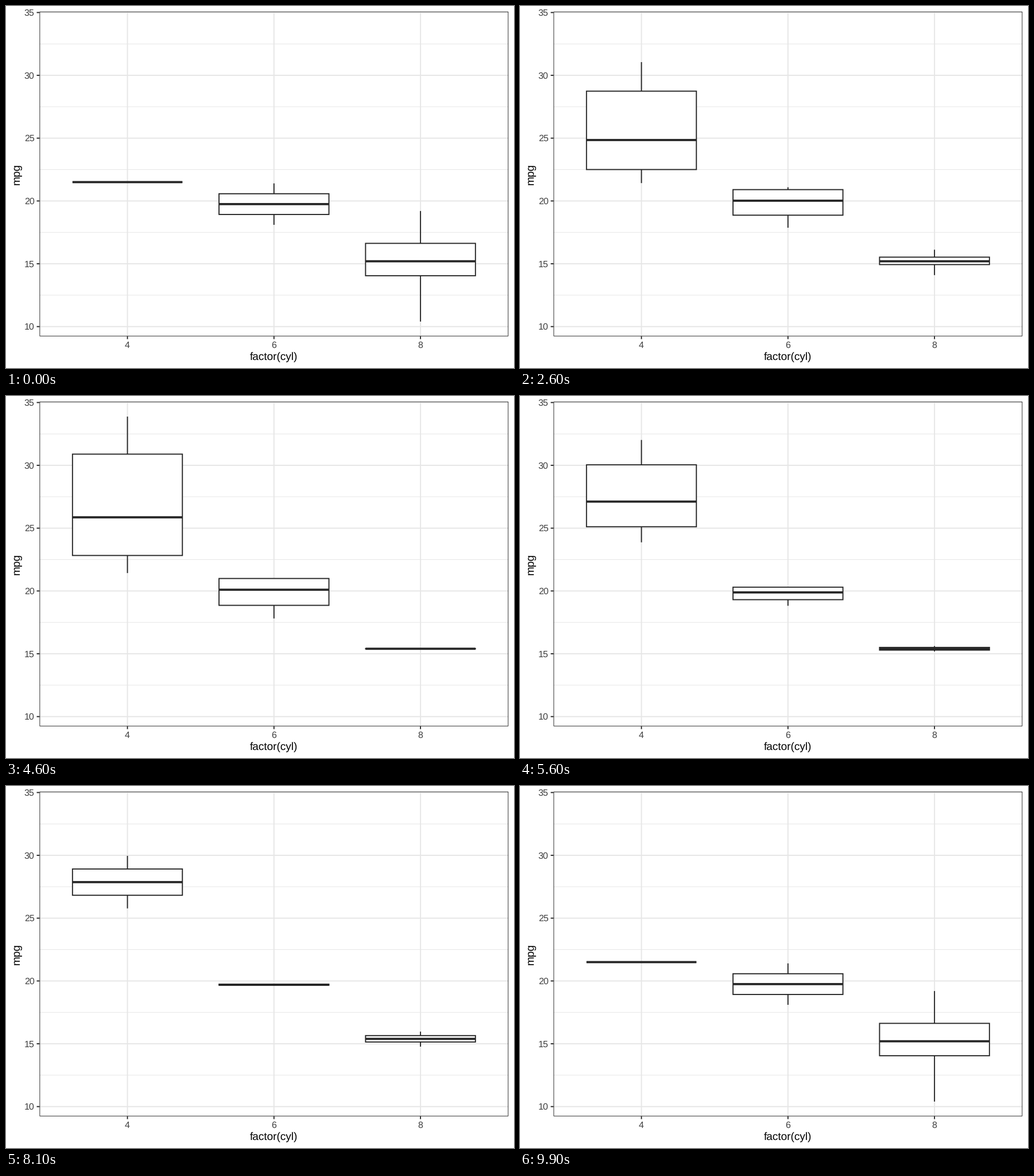
Animation, 885 px wide and 632 px high, one loop 10 s. Source, as a matplotlib script:

```python
import math

import matplotlib.pyplot as plt
from matplotlib.animation import FuncAnimation
from matplotlib.patches import Polygon, Rectangle

plt.rcParams["font.family"] = "Liberation Sans"
plt.rcParams["text.hinting"] = "none"
plt.rcParams["text.hinting_factor"] = 1

W, H, DPI = 885, 632, 64
PT = 72 / DPI                     # points per pixel
LINE = 1.89
LEFT, RIGHT, TOP, BOTTOM = 58.4, 875.27, 9.735, 576.7
Y_MAX, Y_MIN = 35.075, 9.225
INK, GRID, LABEL = "#262626", "#e6e6e6", "#404040"
TICK, GAP = 4.87, 3.89

# min, lower quartile, median, upper quartile, max for each group
FIRST = [
    [21.5] * 5,
    [18.1, 18.925, 19.75, 20.575, 21.4],
    [10.4, 14.05, 15.2, 16.625, 19.2],
]
SECOND = [
    [21.4, 22.8, 25.85, 30.9, 33.9],
    [17.8, 18.85, 20.1, 21.0, 21.0],
    None,
]
THIRD = [
    [26.0, 27.1, 28.2, 29.3, 30.4],
    [19.7] * 5,
    [15.0, 15.2, 15.4, 15.6, 15.8],
]
# start frame, end frame, state before, state after
MOVES = [(11, 33, FIRST, SECOND), (45, 66, SECOND, THIRD), (78, 99, THIRD, FIRST)]


def px(x):
    return LEFT + (x - 0.4) / 3.2 * (RIGHT - LEFT)


def py(y):
    return TOP + (Y_MAX - y) / (Y_MAX - Y_MIN) * (BOTTOM - TOP)


fig = plt.figure(figsize=(W / DPI, H / DPI), dpi=DPI, facecolor="white")
ax = fig.add_axes([0, 0, 1, 1])
ax.set_xlim(0, W)
ax.set_ylim(H, 0)
ax.axis("off")


def line(xs, ys, color, width, z):
    return ax.plot(xs, ys, color=color, lw=width * PT, zorder=z,
                   solid_capstyle="butt", snap=False)[0]


def text(x, y, s, size, color, ha="center", **kw):
    ax.text(x, y, s, fontsize=size * PT, color=color, ha=ha, va="baseline", **kw)


def draw_panel():
    for i in range(5):
        y = py(12.5 + 5 * i)
        line([LEFT, RIGHT], [y, y], GRID, LINE / 2, 1)
    for v in range(10, 36, 5):
        y = py(v)
        line([LEFT, RIGHT], [y, y], GRID, LINE, 2)
        line([LEFT - TICK, LEFT], [y, y], INK, LINE, 2)
        text(LEFT - TICK - GAP, y + 5.6, str(v), 15.58, LABEL, "right")
    for i, name in enumerate("468"):
        x = px(i + 1)
        line([x, x], [TOP, BOTTOM], GRID, LINE, 2)
        line([x, x], [BOTTOM, BOTTOM + TICK], INK, LINE, 2)
        text(x, 596.7, name, 15.58, LABEL)
    # only the inner half of the border stroke is visible
    q = LINE / 4
    ax.add_patch(Rectangle((LEFT + q, TOP + q), RIGHT - LEFT - 2 * q,
                           BOTTOM - TOP - 2 * q, fill=False, ec=INK,
                           lw=LINE / 2 * PT, zorder=9, snap=False))
    mid_x, mid_y = (LEFT + RIGHT) / 2, (TOP + BOTTOM) / 2
    text(mid_x, 618.4, "factor(cyl)", 19.47, "black")
    ax.text(23.3, mid_y, "mpg", fontsize=19.47 * PT, color="black", rotation=90,
            rotation_mode="anchor", ha="center", va="baseline")


class Box:
    def __init__(self, x):
        self.x = px(x)
        self.x0, self.x1 = px(x - 0.375), px(x + 0.375)
        self.low = line([], [], INK, LINE, 4)
        self.high = line([], [], INK, LINE, 4)
        self.body = ax.add_patch(Polygon([(0, 0)] * 4, closed=True, fc="white",
                                         ec=INK, lw=LINE * PT, zorder=5,
                                         joinstyle="miter", snap=False))
        self.mid = line([], [], INK, 2 * LINE, 6)
        self.parts = [self.low, self.high, self.body, self.mid]

    def show(self, stats):
        for part in self.parts:
            part.set_visible(stats is not None)
        if stats is None:
            return
        lo, q1, med, q3, hi = map(py, stats)
        self.low.set_data([self.x, self.x], [q1, lo])
        self.high.set_data([self.x, self.x], [q3, hi])
        self.body.set_xy([(self.x0, q1), (self.x0, q3), (self.x1, q3), (self.x1, q1)])
        self.mid.set_data([self.x0, self.x1], [med, med])


def blend(a, b, t):
    """Missing groups collapse to, or grow from, the other one's median."""
    if t <= 0:
        return a
    if t >= 1:
        return b
    a = a or [b[2]] * 5
    b = b or [a[2]] * 5
    e = (1 - math.cos(math.pi * t)) / 2
    return [u + (v - u) * e for u, v in zip(a, b)]


draw_panel()
boxes = [Box(i + 1) for i in range(3)]


def update(frame):
    start, end, before, after = next(m for m in MOVES if frame <= m[1])
    t = (frame - start) / (end - start)
    for box, a, b in zip(boxes, before, after):
        box.show(blend(a, b, t))
    return [p for box in boxes for p in box.parts]


anim = FuncAnimation(fig, update, frames=100, interval=100, repeat=True,
                     repeat_delay=0, blit=False)
plt.show()
```
